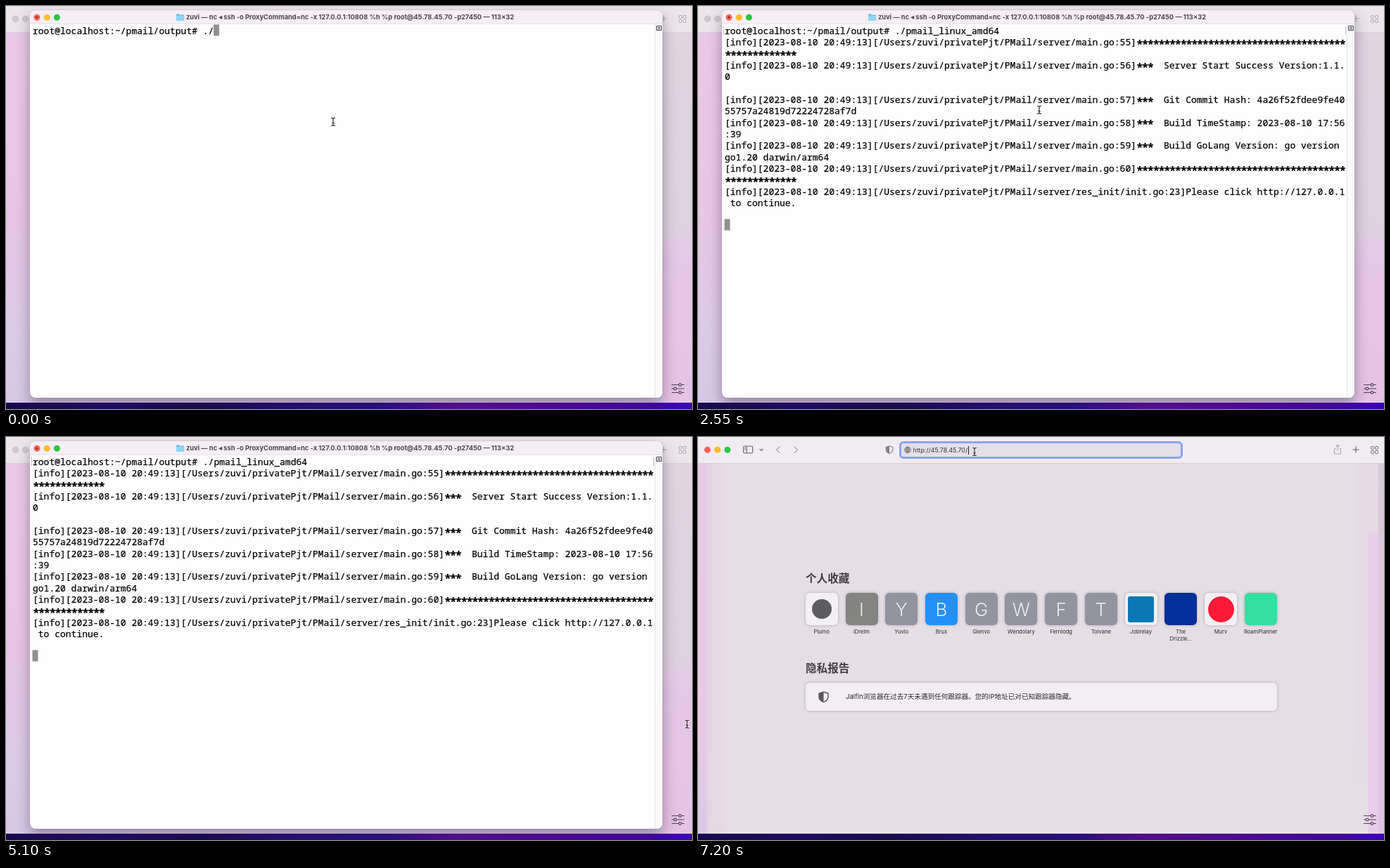
These frames come from a looping animation (975x574 px, 8000 ms). An HTML page:

```html
<!DOCTYPE html>
<html lang="zh-CN">
<head>
<meta charset="utf-8">
<title>Terminal to browser</title>
<style>
html, body { margin: 0; width: 100%; height: 100%; overflow: hidden; }
body {
  position: relative;
  font-family: Inter, "Noto Sans CJK SC", "Noto Sans CJK", sans-serif;
  background: linear-gradient(90deg, #170a4e, #1f0a6c 15%, #170a54 28%, #23107a 42%, #2a0f86 55%, #5a0f9a 66%, #5208a4 80%, #3a04b4);
}
body *, svg { box-sizing: border-box; }
.abs, .win, svg { position: absolute; }
svg { left: 0; top: 0; overflow: visible; }

/* every timed part holds its pose until the next key */
.timed { animation: 8s step-end -2ms infinite; }

/* browser */
.win { left: 0; top: 0; width: 975px; height: 565px; overflow: hidden; }
.bar { left: 0; top: 0; width: 975px; height: 38px; border-bottom: 1px solid #d8d0d8; }
.idle {
  background:
    linear-gradient(#e2d4e1, #ded2e0 55%, #e6c6e8 66%, #e5c3e8) 933px 0 / 42px 565px no-repeat,
    linear-gradient(#e9cae7, #e7c6e5 55%, #dccbe8 80%, #d7c8e7);
}
.idle .bar { background: #ece6eb; }
.active {
  background:
    linear-gradient(#d8cad9, #dcc8dc 50%, #e0c3e2) 967px 0 / 8px 565px no-repeat,
    linear-gradient(#e8d0ea, #e7cfe9) 952px 135px / 15px 430px no-repeat,
    linear-gradient(#e4d9e4, #e6dce6) 935px 0 / 32px 490px no-repeat,
    linear-gradient(#e9cae7, #e8cae6 75%, #d9cae7) 0 0 / 13px 565px no-repeat,
    linear-gradient(90deg, #e6d5e5, #e6dbe5) 13px 0 / 28px 565px no-repeat,
    #e5dfe5;
  animation-name: browser;
}
.active .bar { background: #f1ecf2; }
@keyframes browser { 0% { opacity: 0 } 76.875% { opacity: 1 } }

.field {
  left: 286px; top: 6px; width: 403px; height: 25px;
  border: 3px solid #88a6ee; border-radius: 6px; background: #e5dfe7;
}
.url { left: 305.5px; top: 12px; font-size: 8.8px; line-height: 14px; color: #39353a; }
.caret { left: 384px; top: 13px; width: 1px; height: 12px; background: #222; animation-name: caret; }
@keyframes caret { 0% { opacity: 1 } 84.375% { opacity: 0 } 90% { opacity: 1 } }

h2 {
  position: absolute; left: 153px; margin: 0;
  font-size: 15.6px; line-height: 20px; font-weight: 700; color: #433e44;
}
.tile {
  position: absolute; top: 222px; width: 46px; height: 46px; border-radius: 6px;
  box-shadow: 0 0 4px rgba(90, 70, 95, .35);
  display: flex; align-items: center; justify-content: center;
  font-size: 26px; font-weight: 300; color: #ecebee;
}
.mark { width: 37px; height: 37px; }
.name {
  position: absolute; top: 273px; width: 60px; text-align: center;
  font-size: 7.6px; line-height: 10px; color: #2d292e;
}
.card {
  left: 153px; top: 350px; width: 670px; height: 40px; border-radius: 6px;
  background: #f1eff2; box-shadow: 0 0 4px rgba(90, 70, 95, .35);
  padding-left: 57px; font-size: 9.6px; line-height: 40px; color: #2d292e; white-space: nowrap;
}

/* terminal */
.term, .shade { left: 34px; top: 6px; width: 899px; height: 552px; border-radius: 8px; }
.term { overflow: hidden; background: #fefefe; }
.shade { box-shadow: 0 0 1px rgba(50, 30, 50, .6), 0 9px 20px rgba(45, 22, 50, .38); }
.head { left: 0; top: 0; width: 899px; height: 20px; background: #f5eef5; border-bottom: 1px solid #e9e2e9; }
.title {
  left: 189px; top: 9px; width: 600px; text-align: center;
  font-size: 9.32px; line-height: 14px; font-weight: 700; color: #4c474d; white-space: nowrap;
}
.track { left: 888px; top: 20px; width: 11px; height: 532px; background: #fafafa; border-left: 1px solid #e6e6e6; }
pre {
  position: absolute; left: 38px; top: 27px; margin: 0; color: #000;
  font: 500 13px/16.35px "Noto Sans Mono", "DejaVu Sans Mono", monospace;
  -webkit-text-stroke: .25px #000;
}
/* larger stars on the same 7.8px grid */
pre i { font: 700 16px/0 "Noto Sans Mono", monospace; letter-spacing: -1.8px; position: relative; top: 3.5px; }
.block { left: 0; top: 0; width: 8px; height: 16px; background: #919191; animation-name: block; }
@keyframes block {
  0% { transform: translate(295px, 26.5px) }
  1.875% { transform: translate(303px, 26.5px) }
  5.625% { transform: translate(311px, 26.5px) }
  7.5% { transform: translate(435.5px, 26.5px) }
  18.75% { transform: translate(37.5px, 303.5px) }
}
.key1 { animation-name: key1; }
.key2 { animation-name: key2; }
.tab { animation-name: tab; }
#log { top: 43.35px; animation-name: log; }
@keyframes key1 { 0% { opacity: 0 } 1.875% { opacity: 1 } }
@keyframes key2 { 0% { opacity: 0 } 5.625% { opacity: 1 } }
@keyframes tab { 0% { opacity: 0 } 7.5% { opacity: 1 } }
@keyframes log { 0% { opacity: 0 } 18.75% { opacity: 1 } }

/* dock label and pointer */
.tip {
  left: 900.5px; top: 467.5px; width: 90px; height: 20px; border-radius: 5px;
  background: rgba(239, 228, 240, .95); box-shadow: 0 0 2px rgba(70, 50, 75, .4);
  padding-left: 9.5px; font-size: 9.9px; line-height: 20px; color: #1f1b20; white-space: nowrap;
  animation-name: tip;
}
@keyframes tip { 0% { opacity: 0 } 67.5% { opacity: 1 } 78.75% { opacity: 0 } }
.pointer { width: 1px; height: 1px; animation-name: pointer; }
@keyframes pointer {
  0% { transform: translate(465px, 165px) }
  31.875% { transform: translate(485px, 148px) }
  33.75% { transform: translate(555px, 95px) }
  35.625% { transform: translate(660px, 45px) }
  37.5% { transform: translate(765px, 28px) }
  39.375% { transform: translate(850px, 78px) }
  41.25% { transform: translate(880px, 155px) }
  43.125% { transform: translate(866px, 164px) }
  45% { transform: translate(842px, 185px) }
  46.875% { transform: translate(833px, 193px) }
  48.75% { transform: translate(850px, 145px) }
  50.625% { transform: translate(880px, 80px) }
  52.5% { transform: translate(905px, 23px) }
  54.375% { transform: translate(916px, 40px) }
  56.25% { transform: translate(921px, 70px) }
  58.125% { transform: translate(908px, 130px) }
  60% { transform: translate(880px, 225px) }
  61.875% { transform: translate(894px, 330px) }
  63.75% { transform: translate(968px, 409px) }
  67.5% { transform: translate(1000px, 450px) }
  78.75% { transform: translate(935px, 465px) }
  80.625% { transform: translate(820px, 375px) }
  82.5% { transform: translate(650px, 235px) }
  84.375% { transform: translate(500px, 115px) }
  86.25% { transform: translate(405px, 52px) }
  88.125% { transform: translate(376px, 35px) }
  90% { transform: translate(393px, 21px) }
}
</style>
</head>
<body>

<svg width="0" height="0">
  <defs>
    <path id="plus" d="M930.5 18h9M935 13.5v9" fill="none" stroke="currentColor" stroke-width="1.2"/>
    <g id="grid" fill="none" stroke="currentColor">
      <rect x="956.5" y="13.5" width="4" height="4" rx="1"/><rect x="962.5" y="13.5" width="4" height="4" rx="1"/>
      <rect x="956.5" y="19.5" width="4" height="4" rx="1"/><rect x="962.5" y="19.5" width="4" height="4" rx="1"/>
    </g>
    <g id="sliders" fill="none" stroke="#54435a" stroke-width="1.2">
      <path d="M946 539.5h10m4 0h4M946 545h3m4 0h11M946 550.5h10m4 0h4"/>
      <circle cx="958" cy="539.5" r="1.9"/><circle cx="951" cy="545" r="1.9"/><circle cx="958" cy="550.5" r="1.9"/>
    </g>
    <g id="shield">
      <path d="M0-6.5L6-4.3V0C6 3.4 3 5.8 0 7-3 5.8-6 3.4-6 0V-4.3Z" fill="none" stroke="currentColor" stroke-width="1.3"/>
      <path d="M0-6.5L-6-4.3V0C-6 3.4-3 5.8 0 7Z" fill="currentColor"/>
    </g>
    <g id="lights">
      <circle r="4.5" fill="#ff5f57"/><circle cx="14.2" r="4.5" fill="#febc2e"/><circle cx="28.4" r="4.5" fill="#28c840"/>
    </g>
    <path id="beam" d="M-2.5-5.500q2 0 2.500 1 .5-1 2.500-1M0-4.500v9M-2.500 5.500q2 0 2.500-1 .5 1 2.500 1M-1.300 1.800h2.600" fill="none" stroke-linecap="round"/>
  </defs>
</svg>

<div class="win idle">
  <div class="abs bar"></div>
  <svg width="975" height="565">
    <g fill="#d0c9cf" stroke="#c2bbc1" stroke-width=".6"><circle cx="13.5" cy="18.3" r="4.4"/><circle cx="27.7" cy="18.3" r="4.4"/></g>
    <g color="#aaa3aa"><use href="#plus"/><use href="#grid"/></g>
    <use href="#sliders"/>
  </svg>
</div>

<div class="abs shade"></div>
<div class="abs term">
  <div class="abs head"></div>
  <div class="abs track"></div>
</div>
<div class="abs title">zuvi — nc ◂ ssh -o ProxyCommand=nc -x 127.0.0.1:10808 %h %p root@45.78.45.70 -p27450 — 113×32</div>
<svg width="975" height="574">
  <use href="#lights" x="44" y="16.2"/>
  <circle cx="44" cy="16.2" r="1.4" fill="#8c1a10"/>
  <path d="M242 12.2q0-1 1-1h3l1.2 1.3h5q1 0 1 1v6.3q0 1-1 1h-9.2q-1 0-1-1Z" fill="#6fc1ec"/>
  <path d="M242 14h11.2v5.8q0 1-1 1h-9.2q-1 0-1-1Z" fill="#8fd5f7"/>
  <path d="M924.5 28.5h7v6h-7ZM926 30.5h4M926 32.5h4" fill="none" stroke="#444"/>
  <path class="timed key1" d="M36.5 29v12M920.5 29v12" stroke="#bdbdbd"/>
</svg>
<div class="abs timed block"></div>
<pre>root@localhost:~/pmail/output# ./<span class="timed key1">p</span><span class="timed key2">m</span><span class="timed tab">ail_linux_amd64</span></pre>
<pre id="log" class="timed"></pre>

<div class="win timed active">
  <div class="abs bar"></div>
  <div class="abs field"></div>
  <div class="abs url">http://45.78.45.70/</div>
  <div class="abs timed caret"></div>
  <h2 style="top:192px">个人收藏</h2>
  <div id="tiles"></div>
  <h2 style="top:320px">隐私报告</h2>
  <div class="abs card">Jalfin浏览器在过去7天未遇到任何跟踪器。您的IP地址已对已知跟踪器隐藏。</div>
  <svg width="975" height="565">
    <use href="#lights" x="13.5" y="18.3"/>
    <g fill="none" stroke="#6b656c" stroke-width="1.2">
      <rect x="64.6" y="13" width="13" height="10" rx="1.8"/><path d="M69.2 13v10M66 15.5h1.8M66 17.5h1.8"/>
      <path d="M87.7 17l2.3 2.3 2.3-2.3"/>
    </g>
    <g fill="none" stroke="#b0a9b1" stroke-width="1.3">
      <path d="M116.5 13.5l-5 4.7 5 4.7M136.5 13.5l5 4.7-5 4.7"/>
      <path d="M906.5 16.5h-2v7.5h9v-7.5h-2M909 20.5v-9M906.5 13.7l2.5-2.5 2.5 2.5" stroke-width="1.1"/>
    </g>
    <g fill="none" stroke="#6b656c" stroke-width=".8">
      <circle cx="298" cy="18.3" r="4.3"/><ellipse cx="298" cy="18.3" rx="2" ry="4.3"/>
      <path d="M293.7 18.3h8.6M298 14v8.6M294.5 16h7M294.5 20.6h7"/>
    </g>
    <use href="#shield" color="#858087" transform="translate(272 18) scale(.8)"/>
    <use href="#shield" color="#5b565c" transform="translate(178.5 370) scale(1.08)"/>
    <g color="#69636a"><use href="#plus"/><use href="#grid"/></g>
    <use href="#sliders"/>
  </svg>
</div>

<div class="abs timed tip">Jalfin浏览器</div>

<svg class="timed pointer">
  <use href="#beam" stroke="#fff" stroke-width="2.4" stroke-opacity=".8"/>
  <use href="#beam" stroke="#151515" stroke-width="1.1"/>
</svg>

<script>
const stars = n => `<i>${"*".repeat(n)}</i>`;
const log = (file, text) =>
  `[info][2023-08-10 20:49:13][/Users/zuvi/privatePjt/PMail/server/${file}]${text}`;
const note = (line, text) => log(`main.go:${line}`, `${stars(3)}  ${text}`);

document.getElementById("log").innerHTML = [
  log("main.go:55", stars(38)),
  stars(13),
  note(56, "Server Start Success Version:1.1."),
  "0",
  "",
  note(57, "Git Commit Hash: 4a26f52fdee9fe40"),
  "55757a24819d72224728af7d",
  note(58, "Build TimeStamp: 2023-08-10 17:56"),
  ":39",
  note(59, "Build GoLang Version: go version "),
  "go1.20 darwin/arm64",
  log("main.go:60", stars(38)),
  stars(13),
  log("res_init/init.go:23", "Please click http://127.0.0.1"),
  " to continue."
].join("\n");

// name, tile colour, letter or mark style
const grey = "#92949f", pale = "#f2f0f2";
const sites = [
  ["Plumo", pale, "background:#5d5d5f;border-radius:50%;width:28px;height:28px"],
  ["iDrelm", "#848482", "I"],
  ["Yuvlo", grey, "Y"],
  ["Brux", "#2390f8", "B"],
  ["Glenvo", grey, "G"],
  ["Wendolary", grey, "W"],
  ["Fernlodg", grey, "F"],
  ["Tolvane", grey, "T"],
  ["Jobrelay", pale, "background:#0a78b5;border-radius:3px"],
  ["The<br>Drizzle...", "#03309a", ""],
  ["Murv", pale, "background:#fb1a38;border-radius:50%"],
  ["RoamPlanner", "#34e0a1", ""]
];
document.getElementById("tiles").innerHTML = sites.map(([name, color, face], i) => {
  const x = 175.8 + i * 56.72;
  const inner = face.length > 1 ? `<div class="mark" style="${face}"></div>` : face;
  return `<div class="tile" style="left:${x - 23}px;background:${color}">${inner}</div>
    <div class="name" style="left:${x - 30}px">${name}</div>`;
}).join("");
</script>
</body>
</html>
```
